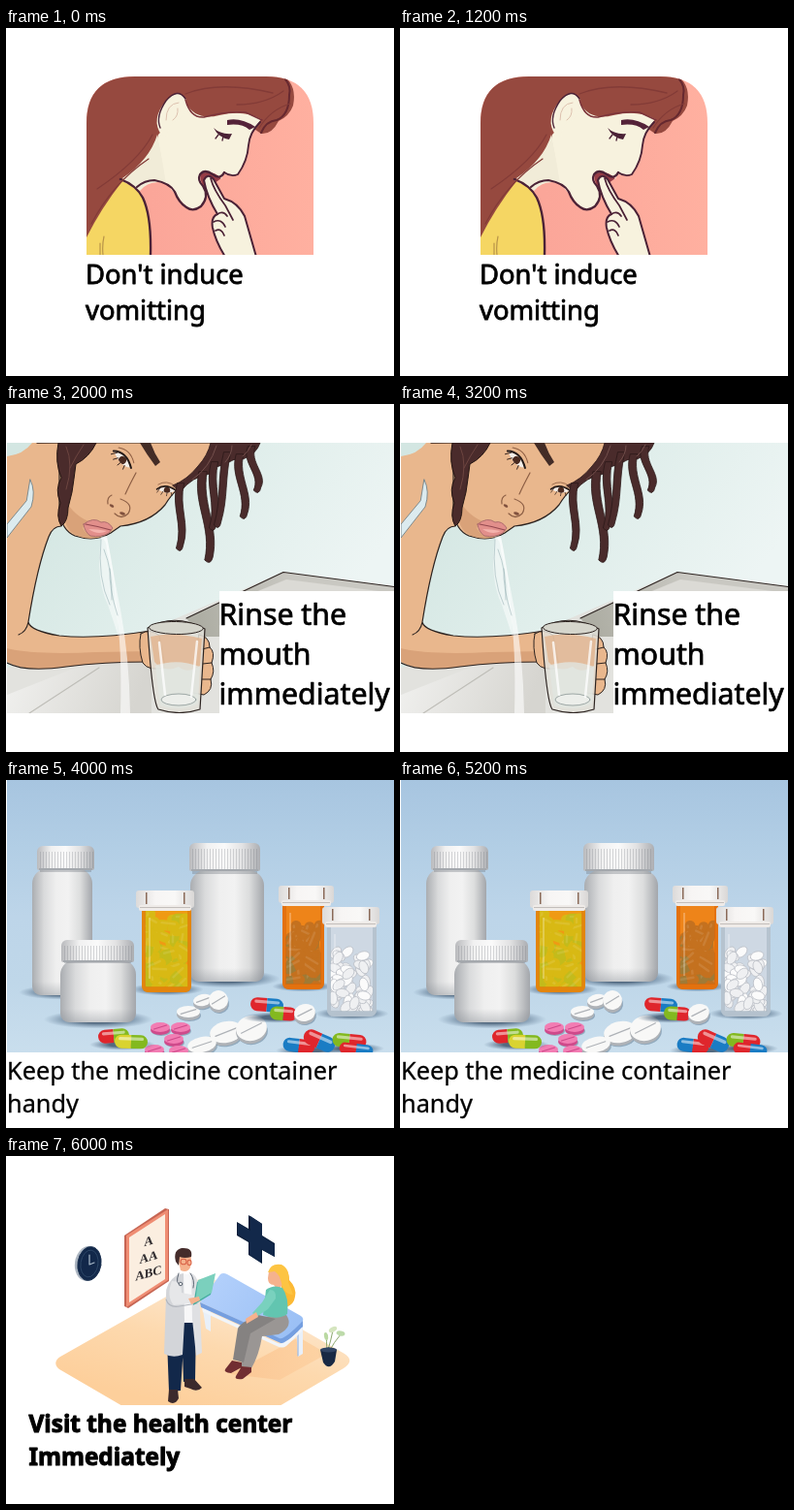
Write an HTML page with a canvas that moves like this. It is 400 px wide and 359 px high and loops after 8000 ms.

```html
<!DOCTYPE html>
<html lang="en">
<head>
<meta charset="utf-8">
<title>First aid steps</title>
<style>
html, body { margin: 0; width: 100%; height: 100%; overflow: hidden; background: #fff; }
canvas { display: block; }
</style>
</head>
<body>
<canvas id="stage" width="400" height="359"></canvas>
<script>
const c = document.getElementById('stage').getContext('2d');
const SCENE_MS = 2000;

function path(d, fill, stroke, width = 1.5) {
  const p = new Path2D(d);
  if (fill) { c.fillStyle = fill; c.fill(p); }
  if (stroke) {
    c.strokeStyle = stroke;
    c.lineWidth = width;
    c.stroke(p);
  }
}
function line(d, color, width) { path(d, null, color, width); }
function oval(x, y, rx, ry, fill, stroke, width = 1, turn = 0) {
  c.beginPath();
  c.ellipse(x, y, rx, ry, turn, 0, Math.PI * 2);
  if (fill) { c.fillStyle = fill; c.fill(); }
  if (stroke) { c.strokeStyle = stroke; c.lineWidth = width; c.stroke(); }
}
function rect(x, y, w, h, fill) { c.fillStyle = fill; c.fillRect(x, y, w, h); }
function box(x, y, w, h, r, fill) {
  c.beginPath();
  c.roundRect(x, y, w, h, r);
  c.fillStyle = fill;
  c.fill();
}
function grad(x0, y0, x1, y1, ...colors) {
  const g = c.createLinearGradient(x0, y0, x1, y1);
  colors.forEach((col, i) => g.addColorStop(i / (colors.length - 1), col));
  return g;
}
// `heft` adds a thin outline for weights between the installed ones
function text(lines, x, y, step, size, weight, heft) {
  c.font = `${weight} ${size}px "Noto Sans", "Open Sans", sans-serif`;
  c.fillStyle = c.strokeStyle = '#000';
  c.lineWidth = heft;
  lines.forEach((s, i) => {
    c.fillText(s, x, y + i * step);
    c.strokeText(s, x, y + i * step);
  });
}
function clipped(d, draw) {
  c.save();
  c.clip(new Path2D(d));
  draw();
  c.restore();
}
function seeded(n) {
  return () => (n = (n * 16807) % 2147483647) / 2147483647;
}

function induce() {
  const ink = '#4b2236', skin = '#f7f2de';
  clipped('M83 234V98Q83 50 133 50H268Q317 50 317 98V234Z', () => {
    rect(83, 50, 234, 184, grad(150, 0, 317, 0, '#fba699', '#ffb0a0'));
    path('M83 50H287Q300 60 296 80Q292 91 281 96Q274 110 263 109L250 100 200 112 162 140 122 160 83 234Z', '#96493f');
    path('M83 216Q98 186 120 158Q139 166 145 184Q150 206 149 234H83Z', '#f5d663');
    path('M186 78Q196 96 220 90Q245 84 263 94Q252 108 250 120Q249 138 239 151Q231 154 224 150L222 156 203 150Q198 152 200 158L206 168Q207 177 201 184Q193 190 186 185Q176 173 165 160Q147 156 138 167L118 157Q152 142 157 110Z', skin);
    path('M120 155Q148 136 156 110Q161 135 165 160Q148 156 138 168Z', '#f1ecd8');
    path('M160 110Q149 94 165 75Q177 61 186 74Q188 88 178 95Q167 99 166 112Z', skin);
    line('M159 103Q154 91 165 75Q177 61 185 73', ink, 1.4);
    line('M165 95Q165 78 178 77M172 95Q178 91 177 83', '#dcc0ae', 1);
    line('M185 74Q190 93 204 92Q226 86 247 87L264 95', '#7b3339', 1.5);
    path('M228 95Q242 92 257 102L251 105Q243 98 228 100Z', '#552339');
    path('M214 103Q221 110 233 109L230 115Q219 113 214 103Z', ink);
    line('M219 110L216 114M224 112L223 116', ink, 1.3);
    line('M262 97Q251 108 250 121Q249 137 239 151Q232 154 225 149', ink, 1.9);
    path('M200 151Q211 145 222 155L215 160 209 171Q201 164 200 151Z', '#963c46');
    line('M225 149Q221 157 213 151Q205 145 200 151Q197 157 203 163Q210 174 201 184Q193 190 186 185Q178 180 174 169Q169 160 153 157Q143 157 135 164', ink, 2.2);
    line('M118 156Q134 162 141 175Q150 194 149 234', ink, 2.4);
    path('M204 157Q208 149 214 156L225 176Q239 180 246 194L258 236H226Q216 220 213 206Q211 195 218 192Q207 174 204 157Z', skin, ink, 2);
    line('M211 155Q214 167 226 183L234 198M218 192Q224 188 228 194M214 200Q222 196 226 205M216 209Q222 206 225 214', ink, 1.7);
    line('M263 108Q268 96 279 95Q292 90 292 69Q294 60 288 53', '#66282f', 2);
    line('M261 103Q273 84 293 78M238 79Q267 79 286 65M88 202Q110 160 147 135M94 166Q137 137 151 110M185 68Q220 54 275 67', '#833b37', 1.3);
    line('M97 234V222M100 234Q99 224 101 215', '#b89448', 1.2);
  });
  text(["Don't induce", 'vomitting'], 82, 264, 37, 27.4, 400, .8);
}

// A twisted strand with a pointed tip
function lock(x, y, dx, len, w) {
  const ex = x + dx, ey = y + len;
  path(`M${x - w} ${y}C${x - w - 7} ${y + len * .35} ${ex + 8 - w} ${y + len * .6} ${ex - w} ${ey - 3}Q${ex + 2} ${ey + 3} ${ex + w} ${ey - 6}C${ex + 11} ${y + len * .6} ${x + w - 6} ${y + len * .35} ${x + w} ${y}Z`, '#4a2b2b', '#2b1818', .8);
}
// A downcast eye: white sliver, iris and heavy upper lid
function eye(x, y, turn, size) {
  c.save();
  c.translate(x, y);
  c.rotate(turn);
  c.scale(size, size);
  path('M-12 -2Q-2 -9 11 1Q2 7 -12 -2Z', '#f3eee8');
  clipped('M-12 -2Q-2 -9 11 1Q2 7 -12 -2Z', () => oval(0, 0, 4, 4, '#4a2a20'));
  line('M-13 -2Q-2 -10 12 1', '#241a18', 2);
  line('M-11 -8Q0 -14 11 -5', '#8f5f43', 1);
  line('M-9 -3L-13 2M-5 1L-8 5M0 3L-1 7M5 3L6 7', '#35231e', .9);
  c.restore();
}

function rinse() {
  const ink = '#2c2320', skin = '#e9b78d', shade = '#d9a279';
  clipped('M1 40H400V319H1Z', () => {
    rect(1, 40, 399, 279, grad(60, 40, 330, 230, '#d3e6e2', '#e0eeeb', '#edf5f4'));
    path('M1 272L150 232 220 202 286 173 400 188V319H1Z', '#e2e2de');
    path('M186 221L286 174 400 189V240H200Z', grad(200, 220, 300, 190, '#aeaea4', '#c9c8c2'));
    path('M228 206L289 181 400 195V240H228Z', '#dbdad5');
    line('M186 221L286 173.5 400 188.5', ink, 1.2);
    path('M1 300L82 268 150 264V319H1Z', grad(0, 270, 130, 319, '#f1f1ef', '#d6d5d0'));
    line('M24 319L96 272', '#bfbeb8', 1.2);

    path('M1 54Q18 52 27 40H70L57 126Q48 126 44 137 32 168 23 225Q25 234 55 239 92 243 149 234V266Q100 266 62 271 20 277 1 266Z', skin);
    path('M1 252Q30 259 92 256L149 255V266Q100 266 62 271 20 277 1 266Z', shade);
    line('M57 126Q48 126 44 137 32 168 23 225Q25 234 55 239 92 243 149 234M1 267Q20 277 62 271 100 266 149 266M23 225Q21 235 13 238', ink, 1.2);
    path('M25 78Q31 90 26 106L1 138V124L21 100Z', '#dcebef', '#74848a', .9);

    path('M55 40H226Q220 62 194 77Q176 84 164 104Q148 123 118 126L108 133Q92 143 71 136Q57 130 55 110Z', skin, ink, 1.2);
    path('M58 92Q66 113 85 121L79 128Q84 138 99 137Q80 142 67 132Q57 122 58 92Z', shade);
    path('M32 40H93Q86 55 72 62Q70 78 68 91L64 107Q64 121 57 126Q51 116 56 102Q50 88 57 76Q50 60 54 40Z', '#4a2b2b', '#241512', 1);
    line('M62 44Q70 62 62 88M80 42Q72 54 66 66', '#6d4540', 1);

    path('M138 40L149 40Q153 51 159 60L154 64Q145 52 138 40Z', '#432c26');
    eye(120, 58, .65, 1);
    eye(166, 89, -.05, .8);
    line('M134 71Q127 84 123 93M118 98Q132 103 126 113Q119 120 112 113M105 103Q104 96 109 94', '#8d5f45', 1.2);
    oval(109, 105, 2.5, 1.3, '#80503d', null, 1, .5);
    oval(120, 113, 3, 1.5, '#80503d', null, 1, .3);
    path('M80 124Q90 116 98 122Q105 120 110 128L106 133Q98 138 87 136Q81 132 80 124Z', '#e28f8b', '#a9686a', .9);
    path('M85 129Q94 129 104 131Q95 136 85 129Z', '#f4b3ad');
    line('M82 124Q94 126 108 130', '#944950', 1.2);

    path('M172 84Q187 78 198 64Q208 53 211 40H262Q258 52 244 57 234 55 225 64 216 62 210 72Q192 75 180 90Z', '#4a2b2b', '#2b1818', .8);
    lock(180, 82, -1, 70, 3.6);
    lock(203, 70, 6, 94, 4.2);
    lock(215, 60, -2, 71, 3.6);
    lock(228, 50, -10, 78, 3.6);
    lock(241, 52, 4, 67, 3.8);
    lock(253, 44, 6, 48, 3.8);
    line('M192 78Q210 66 217 43M226 60Q233 52 233 43M244 54Q250 49 253 42', '#74504c', 1);

    path('M97 137Q104 139 104 152Q112 180 113 211Q120 250 118 319H128Q127 260 118 212L109 165 104 136Z', 'rgba(255,255,255,.6)');
    path('M98 138Q92 180 105 207L116 240Q114 180 104 138Z', 'rgba(255,255,255,.5)');
    line('M98 140Q94 180 107 207M101 150Q110 172 109 202M107 170Q106 190 115 218', 'rgba(140,168,172,.5)', 1);

    path('M139 237Q149 231 158 239L164 272Q147 276 141 267Q136 251 139 237Z', skin, ink, 1);
    path('M199 238Q210 240 210 251Q216 256 212 267Q216 276 211 284Q214 295 204 300L193 298Z', skin, ink, 1);
    line('M210 251L202 253M212 267L203 268M211 284L202 284', ink, 1);
    path('M146 231Q151 307 157 315Q179 322 200 315L205 232Q174 215 146 231Z', 'rgba(226,225,218,.85)', ink, 1.2);
    path('M149 240Q171 234 202 242L200 270Q187 279 178 271 163 278 153 266Z', 'rgba(226,176,136,.75)');
    path('M154 270Q176 262 200 271L198 309Q181 318 159 311Z', 'rgba(226,230,226,.8)');
    oval(175.5, 231, 28, 6.5, '#d5d5cc', ink, 1, .02);
    oval(178, 305, 18, 6, '#eceeea', '#9da7a5');
    line('M158 246L164 300M197 245L191 302', 'rgba(255,255,255,.75)', 2.5);
  });
  rect(220, 193, 180, 126, '#fff');
  text(['Rinse the', 'mouth', 'immediately'], 219.5, 227.5, 41, 30.3, 400, .7);
}

function cap(x, y, w, h) {
  box(x, y, w, h, [6, 6, 2, 2], grad(x, 0, x + w, 0, '#b9babd', '#f1f1f1', '#fafafa', '#e2e2e3', '#acaeb2'));
  for (let i = 3; i < w - 1; i += 3) rect(x + i, y + 6, .8, h - 8, 'rgba(120,124,130,.35)');
  rect(x + 2, y + h - 2, w - 4, 2, '#a4a8ad');
}
function shadow(x, y, rx) {
  c.save();
  c.translate(x, y);
  c.scale(1, .17);
  const g = c.createRadialGradient(0, 0, rx * .4, 0, 0, rx);
  g.addColorStop(0, 'rgba(45,68,92,.75)');
  g.addColorStop(1, 'rgba(70,99,130,0)');
  oval(0, 0, rx, rx, g);
  c.restore();
}
function bottle(x, y, w, h, cx, cy, cw, ch) {
  shadow(x + w / 2, y + h - 3, w * .72);
  box(x, y, w, h, [16, 16, 9, 9], grad(x, 0, x + w, 0, '#aaadb1', '#dadbdc', '#efefef', '#f2f2f2', '#dcdddd', '#a3a6ab'));
  box(x, y + h - 14, w, 14, [0, 0, 9, 9], grad(0, y + h - 14, 0, y + h, 'rgba(120,126,134,0)', 'rgba(120,126,134,.35)'));
  rect(cx + 3, y, cw - 6, 4, 'rgba(110,116,124,.35)');
  cap(cx, cy, cw, ch);
}
function capsule(x, y, len, r, turn, a, b, shine = .5) {
  c.save();
  c.translate(x, y);
  c.rotate(turn);
  box(-len / 2, -r, len / 2, r * 2, [r, 0, 0, r], a);
  box(0, -r, len / 2, r * 2, [0, r, r, 0], b);
  box(-len / 2 + 4, -r * .65, len - 8, r * .45, r / 4, `rgba(255,255,255,${shine})`);
  c.restore();
}
function tablet(x, y, rx, ry, top, side, turn = -.2) {
  oval(x + 1, y + 4, rx, ry, 'rgba(64,92,119,.4)', null, 1, turn);
  oval(x, y + 3, rx, ry, side, null, 1, turn);
  oval(x, y, rx, ry, top, null, 1, turn);
  line(`M${x - rx * .65} ${y + ry * .4}L${x + rx * .65} ${y - ry * .4}`, side, 1.2);
}
function vial(x, y, w, h, capX, capY, capW, fill, edge, top, drawPill, seed) {
  const rnd = seeded(seed);
  shadow(x + w / 2, y + h - 3, w * .75);
  box(x, y, w, h, [2, 2, 7, 7], fill);
  clipped(`M${x + 3} ${y}H${x + w - 3}V${y + h - 5}H${x + 3}Z`, () => {
    for (let i = 0; i < 60; i++) {
      const px = x + 6 + rnd() * (w - 12), py = y + h * (top + rnd() * (.93 - top));
      drawPill(px, py, rnd() * 3, i);
    }
  });
  rect(x, y, 4, h - 6, edge);
  rect(x + w - 4, y, 4, h - 6, edge);
  rect(x + 7, y + 10, 2, h - 24, 'rgba(255,255,255,.25)');
  box(x, y + h - 6, w, 6, [0, 0, 7, 7], edge);
  box(capX, capY, capW, 18, 3, grad(capX, 0, capX + capW, 0, '#dcdad9', '#f7f5f4', '#f9f8f7', '#d9d7d6'));
  box(capX + 3, capY + 15, capW - 6, 6, 2, '#efebe8');
  rect(capX + 4, capY + 17, capW - 8, 1, '#c3bebb');
  for (const px of [capX + 10, capX + capW - 11]) rect(px, capY + 2, 1.5, 12, '#8a6a58');
}

function keep() {
  rect(1, 0, 399, 281, grad(0, 0, 0, 281, '#a7c5e0', '#b2cee5', '#bdd5e9', '#bfd7e9', '#c9deed'));
  bottle(27, 91, 62, 131, 32, 68, 59, 25);
  bottle(190, 93, 76, 115, 189, 65, 73, 29);
  const inAmber = (a, b) => (x, y, t, i) => capsule(x, y, 24, 5.5, t - 1.9, i % 2 ? a : b, a, .1);
  const inClear = (x, y, t, i) => oval(x, y, 7, 4.5, i % 3 ? '#eff0f2' : '#fbfbfb', '#b9bdc4', .8, t);
  vial(140, 132, 51, 87, 134, 114, 60, '#ef9a14', 'rgba(222,122,8,.65)', .12, inAmber('#d8b914', '#c3bb1b'), 41);
  vial(285, 127, 43, 89, 281, 109, 57, '#ee8419', 'rgba(222,104,8,.65)', .32, inAmber('#c4711f', '#a07a35'), 73);
  vial(331, 149, 51, 95, 326, 131, 59, 'rgba(207,217,227,.95)', 'rgba(170,184,197,.65)', .3, inClear, 19);
  bottle(56, 185, 78, 65, 57, 165, 75, 23);
  const red = '#df262c', blue = '#1a7cc4', green = '#83b91f', lime = '#d9d330';
  const white = '#f8f8f7', grey = '#aeb2b7', pink = '#f27db3', rose = '#cf4a8b';
  tablet(188, 239, 12, 6, white, grey, 0);
  tablet(203, 227, 10, 6, white, grey);
  tablet(219, 227, 10, 10, white, grey);
  tablet(227, 260, 17, 11, white, grey);
  tablet(253, 256, 16, 13, white, grey);
  tablet(202, 273, 15, 8, white, grey);
  for (const [x, y] of [[159, 255], [180, 255], [173, 267], [153, 278], [178, 279]]) tablet(x, y, 10, 5, pink, rose, 0);
  for (const [x, y] of [[120, 273], [278, 245], [312, 279], [356, 277]]) shadow(x, y, 34);
  capsule(111, 264, 32, 7, -.08, red, green);
  capsule(129, 270, 34, 7, .03, lime, green);
  capsule(269, 232, 34, 7, .08, red, blue);
  capsule(286, 241, 28, 7, .08, green, red);
  tablet(308, 240, 11, 9, white, grey);
  capsule(302, 274, 33, 7, .12, blue, red);
  capsule(323, 269, 34, 8, .42, red, blue);
  capsule(354, 269, 35, 7, .1, green, red);
  capsule(361, 278, 35, 6, .12, red, blue);
  rect(0, 281, 400, 78, '#fff');
  text(['Keep the medicine container', 'handy'], 1, 309, 34, 25.3, 400, .3);
}

function visit() {
  const navy = '#12284a', skin = '#f5b28d';
  clipped('M0 0H400V257H0Z', () => {
    path('M56 207L190 131Q205 122 220 130L349 204Q360 211 348 219L275 262H127L55 220Q47 213 56 207Z', grad(190, 262, 225, 130, '#fdcf9b', '#fdd9ae', '#fde9d2'));
    path('M231 225L302 187 331 204 282 231Z', grad(240, 225, 331, 200, '#fbc896', '#fdd3a4'));

    oval(84, 111, 13, 18, '#aab4c0', null, 1, .15);
    oval(86, 111, 12, 17.5, navy, '#1d3352', 1, .15);
    oval(86, 111, 9, 14, null, '#2c4666', 1, .15);
    line('M86 102V112L91 110', '#a9bac9', 1.2);

    path('M122 82L164 54 168 55V129L126 157 122 155Z', '#c66553');
    path('M124 82L167 55V128L124 156Z', '#ef8d73');
    path('M127 84L164 60V127L127 151Z', '#fbeee0');
    c.save();
    c.transform(1, -.28, 0, 1, 147, 0);
    c.font = 'bold 13px "Liberation Serif", serif';
    c.textAlign = 'center';
    c.fillStyle = '#332f32';
    ['A', 'AA', 'ABC'].forEach((s, i) => c.fillText(s, 0, 92 + i * 16.5));
    c.restore();

    path('M250 61L264 70V82L277 90V104L264 97V111L250 102V89L238 82V68L250 75Z', '#0b1e3a');
    path('M252 62L264 70V83L277 91V104L263 96V110L251 102V88L239 81V69L252 77Z', navy);

    path('M202 152L211 157V181L206 178ZM299 178L306 174V204L301 207ZM247 180L252 183V217L247 214Z', '#e9f0f9');
    line('M301 181V206', '#9db8df', 1.2);
    path('M200 151L221 122Q224 120 228 122L304 165Q308 168 305 172L289 188Q286 191 281 188Z', grad(210, 130, 290, 188, '#b3d0fb', '#9bc0f5'));
    path('M200 151L282 188Q287 190 306 170V176L291 191Q286 195 281 192L201 156Z', '#759fe0');
    path('M202 157L280 193Q287 196 305 177V181L289 196Q285 199 279 196L203 161Z', '#f1f5fa');

    // Patient
    path('M280 114Q292 114 292 128Q300 136 298 145Q297 153 289 156Q283 148 284 136Z', '#fcb934');
    path('M271 119Q279 113 286 119L285 133 280 138 276 133Q270 133 270 126Z', skin);
    path('M270 120Q273 110 284 112Q293 116 291 130L296 143Q286 143 284 131Q282 122 277 119Z', '#fdc442');
    path('M264 166L289 164Q297 176 281 184L264 186Q261 205 253 219L242 217 248 178Q252 169 264 166Z', '#9a9694');
    path('M260 164L278 168 252 183 245 213 234 210 239 178Q241 172 260 164Z', '#858281');
    path('M268 138Q276 132 285 136Q292 146 290 163Q280 170 265 164Z', '#62c5b0');
    path('M272 138Q279 138 278 147L270 158 258 166 254 162 264 151Z', '#79d1be');
    path('M258 161L247 168 248 173 260 166Z', skin);
    path('M233 211L243 213V218L232 224Q224 223 226 220ZM243 217L253 218V223L244 230Q235 231 237 227Z', '#712e32');

    // Doctor
    path('M166 190L184 180 180 242 168 243ZM181 170L196 172 195 231 183 233Z', navy);
    path('M168 241H177L178 250Q174 258 167 253ZM184 230H194L202 239Q197 244 190 240L184 238Z', '#3b2a2c');
    path('M179 121L194 123 194 172 180 172Z', '#f7f7f8');
    path('M176 123L183 121 184 170 182 205Q172 209 163 204L165 144Q164 131 176 123Z', '#d3d5d9');
    path('M191 121Q198 123 199 139L202 203 196 206 192 168Z', '#dfe0e3');
    path('M171 129Q165 145 173 154L198 151 201 145 181 141 180 130Z', '#e6e7e9');
    line('M165 148Q168 157 179 155L197 152', '#b2b6bd', 1.1);
    path('M177 104Q178 96 186 97Q193 101 190 115Q187 121 180 118Z', skin);
    path('M175 109Q172 97 181 95Q193 94 191 104Q184 106 179 104L178 113Z', '#452c2b');
    oval(183, 109, 3, 2.8, null, '#da6549', 1.1);
    oval(189, 110, 2, 2.6, null, '#da6549', 1.1);
    line('M178 121Q174 133 180 132M190 121Q195 128 193 136', '#5c6572', 1);
    oval(180, 132, 1.8, 1.8, '#f5f5f6', '#5c6572');
    path('M197 130L215 122 211 143 193 154Z', '#45ad9f');
    path('M198 128L216 121 212 141 195 151Z', '#7bd0bd');
    path('M188 147L199 145 200 149 191 153Z', skin);

    path('M331 202Q330 190 331 185M333 202Q338 192 345 184M332 200Q335 190 337 180', null, '#8aa66c', 1);
    oval(330, 186, 2, 4, '#bad9a2', null, 1, -.2);
    oval(337, 179, 4.5, 2.5, '#d5e5bf', null, 1, -.5);
    oval(345, 183, 4.5, 2.5, '#bddaaa', null, 1, .2);
    path('M324 200Q333 195 341 200L339 212Q333 222 327 213Z', '#182944');
    oval(332.5, 200, 8.5, 2.6, '#304464');
  });
  text(['Visit the health center', 'Immediately'], 23.5, 285, 34, 24.4, 800, 1);
}

const scenes = [induce, rinse, keep, visit];
let shown = -1;
const start = performance.now();
c.lineCap = c.lineJoin = 'round';

function tick() {
  const now = Math.floor((performance.now() - start) / SCENE_MS) % scenes.length;
  if (now !== shown) {
    shown = now;
    rect(0, 0, 400, 359, '#fff');
    scenes[now]();
  }
  requestAnimationFrame(tick);
}
tick();
</script>
</body>
</html>
```
